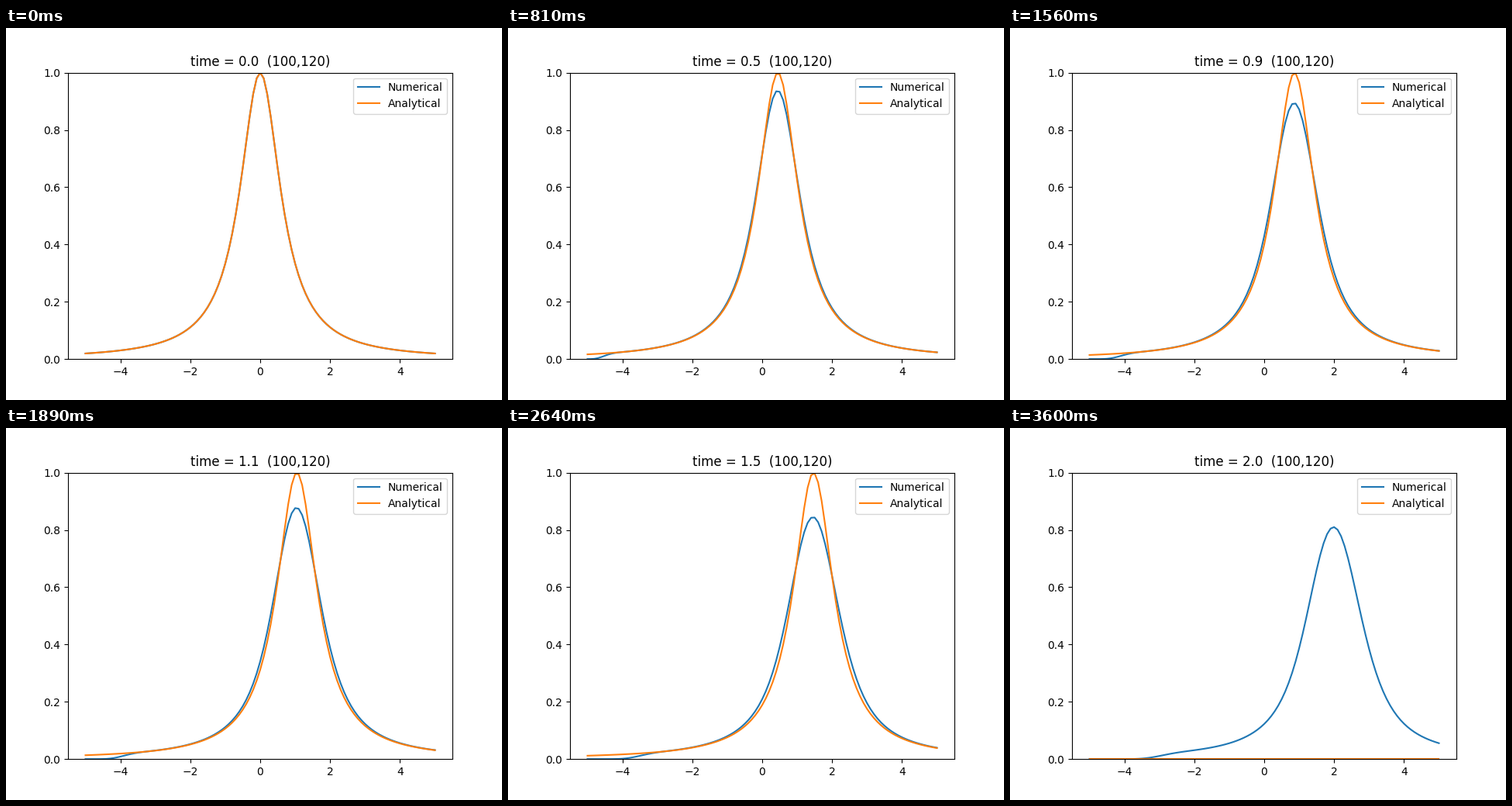
Recreate the animation shown at these times as a matplotlib script. Size 640 by 480 pixels, loop 3630 ms.

```python
import numpy as np
import matplotlib.pyplot as plt
from matplotlib.animation import FuncAnimation

NX, NT = 100, 120
LEFT, RIGHT, T_END = -5.0, 5.0, 2.0
SPEED = 1.0

dx = (RIGHT - LEFT) / NX
dt = T_END / NT
x = np.linspace(LEFT, RIGHT, NX + 1)


def pulse(s):
    return 1 / (1 + 2 * s**2)


def upwind():
    """Advect the pulse with the first-order upwind scheme, zero inflow."""
    c = SPEED * dt / dx
    u = np.zeros((NT + 1, NX + 1))
    u[0] = pulse(x)
    for n in range(NT):
        u[n + 1, 1:] = u[n, 1:] - c * (u[n, 1:] - u[n, :-1])
    return u


numerical = upwind()

# The exact solution is left at zero for the last time level.
analytical = np.zeros_like(numerical)
for n in range(NT):
    analytical[n] = pulse(x - SPEED * n * dt)

fig, ax = plt.subplots(figsize=(6.4, 4.8), dpi=100)
num_line, = ax.plot(x, numerical[0], label="Numerical")
ana_line, = ax.plot(x, analytical[0], label="Analytical")
ax.set_ylim(0, 1)
ax.legend(loc="upper right")
title = ax.set_title("")


def update(n):
    num_line.set_ydata(numerical[n])
    ana_line.set_ydata(analytical[n])
    title.set_text(f"time = {n * dt:.1f}  ({NX},{NT})")
    return num_line, ana_line, title


anim = FuncAnimation(fig, update, frames=NT + 1, interval=30, repeat=True)
plt.show()
```
